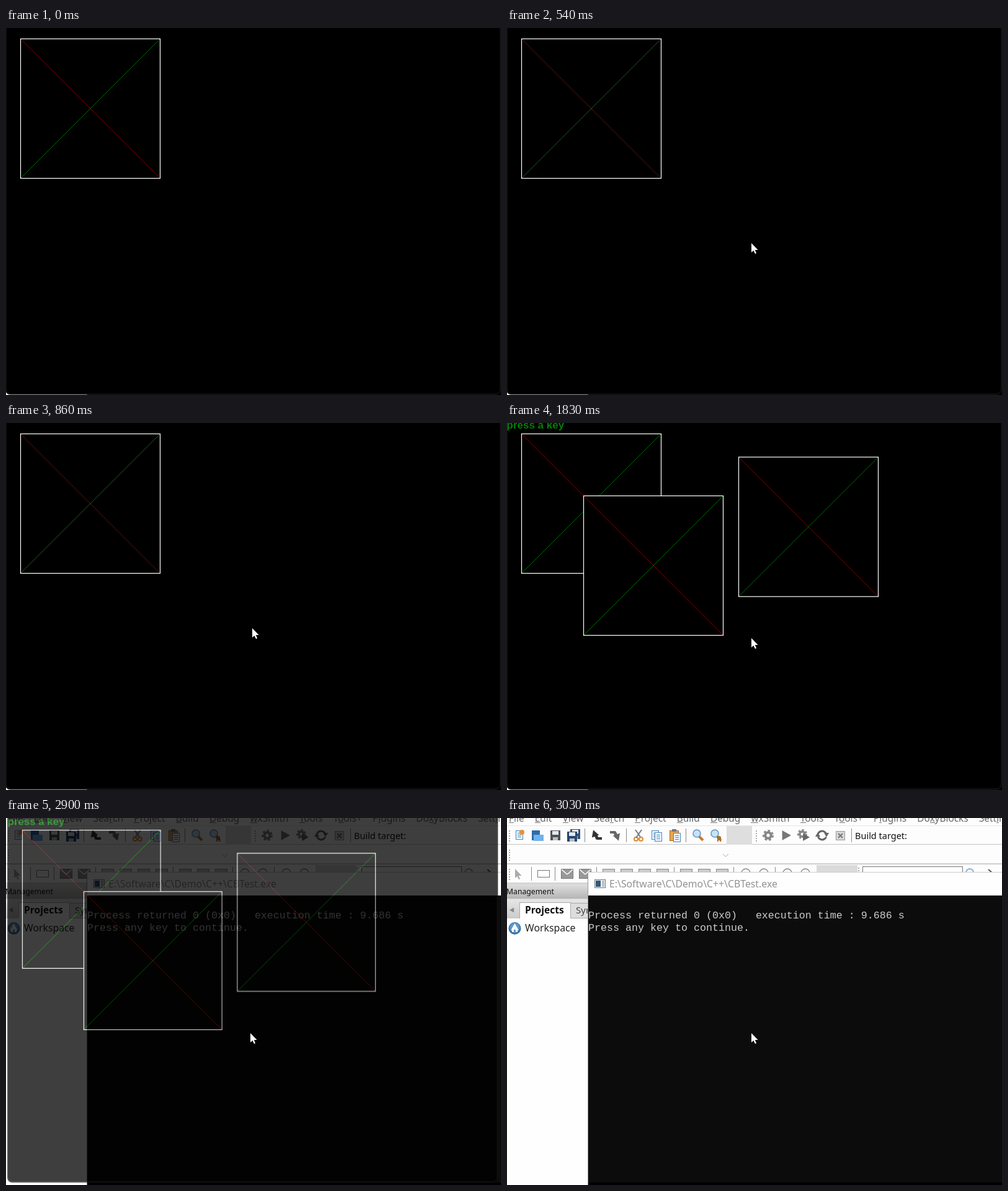
Recreate the animation shown at these times as an HTML page with a canvas. Size 798 by 592 pixels, loop 3.37 s.

```html
<!DOCTYPE html>
<html lang="en">
<head>
<meta charset="utf-8">
<title>Squares</title>
<style>
html, body { margin: 0; width: 100%; height: 100%; overflow: hidden; background: #000; }
canvas { display: block; }
</style>
</head>
<body>
<canvas id="stage" width="798" height="592"></canvas>
<script>
const W = 798, H = 592, LOOP = 3370;
const CLICK = 860, SPREAD = 1830, CLOSE = 2900, GONE = 3030;
const UI = '"Noto Sans", sans-serif';

// Windows and menus reach a little above the stage, so layers keep a margin.
const MARGIN = 40;
function layer() {
  const el = document.createElement('canvas');
  el.width = W + 2 * MARGIN;
  el.height = H + 2 * MARGIN;
  const ctx = el.getContext('2d');
  ctx.translate(MARGIN, MARGIN);
  return ctx;
}
const stage = document.getElementById('stage').getContext('2d');
const desktop = layer(), app = layer();
let c = desktop;

function rect(x, y, w, h, fill) {
  c.fillStyle = fill;
  c.fillRect(x, y, w, h);
}
function box(x, y, w, h, stroke, fill) {
  rect(x, y, w, h, stroke);
  rect(x + 1, y + 1, w - 2, h - 2, fill);
}
function line(x1, y1, x2, y2, stroke, width = 1) {
  c.strokeStyle = stroke;
  c.lineWidth = width;
  c.beginPath();
  c.moveTo(x1, y1);
  c.lineTo(x2, y2);
  c.stroke();
}
function ring(x, y, r, stroke, width = 1, from = 0, to = 2 * Math.PI) {
  c.strokeStyle = stroke;
  c.lineWidth = width;
  c.beginPath();
  c.arc(x, y, r, from, to);
  c.stroke();
}
function disc(x, y, r, fill) {
  c.fillStyle = fill;
  c.beginPath();
  c.arc(x, y, r, 0, 2 * Math.PI);
  c.fill();
}
// Triangle with its tip r to the right, turned by angle.
function triangle(x, y, r, fill, angle = 0) {
  c.save();
  c.translate(x, y);
  c.rotate(angle);
  c.fillStyle = fill;
  c.fill(new Path2D(`M${r} 0L${-r * .8} ${r}V${-r}Z`));
  c.restore();
}
function text(str, x, y, font, fill) {
  c.font = font;
  c.fillStyle = fill;
  c.fillText(str, x, y);
}
function shade(y, h, top, bottom) {
  const g = c.createLinearGradient(0, y, 0, y + h);
  g.addColorStop(0, top);
  g.addColorStop(1, bottom);
  rect(0, y, 131, h, g);
}
function grip(x, y) {
  for (let i = 0; i < 5; i++) rect(x, y + i * 4, 2, 2, '#aaa');
}

const POINTER = new Path2D('M0 0V15L3.5 12L6 17.2L8 16.3L5.8 11H10.6Z');
function pointer(x, y, fill) {
  c.save();
  c.translate(x, y);
  c.fillStyle = fill;
  c.fill(POINTER);
  c.restore();
}

function page(x, y) {
  box(x, y, 12, 15, '#4787bd', '#eef5fc');
  for (let i = 4; i < 12; i += 3) rect(x + 3, y + i, 6, 1, '#4787bd');
}
function floppy(x, y, body) {
  rect(x, y, 16, 16, body);
  rect(x + 3, y + 1, 10, 6, '#e4e8ec');
  rect(x + 4, y + 11, 8, 5, '#b8c0c8');
}
function lens() {
  line(1, 1, 8, 8, '#c77c2b', 4);
  disc(-2, -3, 6, '#c5e3f8');
  ring(-2, -3, 6, '#6597bd', 1.6);
}
function bentArrow(fill) {
  line(-3, -2, 1, 6, fill, 5);
  line(0, 5, 8, 5, fill, 4);
  triangle(-4, -3, 6, fill, -1.9);
}
function gear(r) {
  c.setLineDash([r * .4, r * .385]);
  ring(0, 0, r * .85, '#868686', r * .3);
  c.setLineDash([]);
  ring(0, 0, r * .52, '#868686', r * .45);
}

// Each icon is drawn around its own centre.
const ICONS = {
  n() { page(-6, -8); disc(4, -5, 4, '#e99235'); },
  o() { rect(-9, -8, 13, 16, '#2f6aab'); rect(-6, -1, 16, 10, '#6eb2ec'); },
  s() { floppy(-8, -8, '#4d5358'); },
  S() { floppy(-5, -10, '#31517e'); floppy(-10, -6, '#26456f'); },
  u() { bentArrow('#333'); },
  r() { c.rotate(Math.PI); bentArrow('#666'); },
  x() {
    for (const side of [-1, 1]) {
      line(5 * side, -9, -4 * side, 4, '#727d87', 2);
      ring(4 * side, 6, 3, '#e28b2d', 2);
    }
  },
  c() { page(-8, -8); page(-3, -5); },
  v() { box(-8, -8, 15, 17, '#a66a25', '#e7a550'); rect(-4, -10, 7, 4, '#777'); page(-2, -4); },
  f: lens,
  F() { lens(); text('R', 1, 10, 'bold 12px ' + UI, '#a36324'); },
  g() { gear(9); },
  p() { triangle(0, 0, 8, '#777'); },
  G() { c.translate(-3, -2); gear(8); triangle(6, 5, 6, '#666'); },
  b() {
    for (const turn of [0, Math.PI]) {
      ring(0, 0, 7, '#666', 3, turn + .4, turn + 2.8);
      triangle(7 * Math.cos(turn), -1, 4, '#666', turn + 1.6);
    }
  },
  a() {
    box(-7, -7, 15, 15, '#999', '#d8d8d8');
    line(-3, -3, 4, 4, '#777', 2);
    line(4, -3, -3, 4, '#777', 2);
  },
  P() { pointer(-8, -8, '#aaa'); },
  w() { box(-10, -6, 20, 12, '#777', '#fff'); },
  e() { box(-10, -8, 20, 16, '#777', '#999'); line(-9, -7, 0, 1, '#fff', 1.5); line(9, -7, 0, 1, '#fff', 1.5); },
  d() { box(-10, -8, 20, 16, '#888', '#ccc'); },
  z() { ring(0, -1, 7, '#888', 1.3); },
  '|'() { rect(-1, -11, 1, 22, '#8c8c8c'); }
};
function toolbar(x, y, icons) {
  for (const key of icons) {
    const bar = key === '|';
    c.save();
    c.translate(bar ? x - 10 : x, y);
    ICONS[key]();
    c.restore();
    x += bar ? 9 : 29;
  }
}

function drawMenu() {
  const font = '15.4px ' + UI;
  const labels = '&File &Edit &View Sea&rch &Project &Build &Debug &wxSmith &Tools T&ools+ P&lugins Do&xyBlocks Sett&ings';
  let x = 3;
  for (const label of labels.split(' ')) {
    const [before, after] = label.split('&');
    text(before + after, x, 5.5, font, '#666');
    const key = x + c.measureText(before).width;
    rect(Math.round(key), 7, Math.round(c.measureText(after[0]).width), 1, '#777');
    x += c.measureText(before + after).width + 17.2;
  }
}

function drawToolbars() {
  rect(0, 12, W, 1, '#e6e6e6');
  rect(0, 42, W, 1, '#c4c4c4');
  rect(0, 73, W, 2, '#cfcfcf');
  rect(354, 13, 41, 30, '#dedede');
  rect(499, 76, 66, 28, '#dadada');
  [20, 51, 82].forEach(y => grip(3, y));
  grip(401, 20);
  grip(566, 80);

  toolbar(20, 28, 'nosS|ur|xcv|fF');
  toolbar(421, 28, 'gpGba|');
  text('Build target:', 561, 34, '14.5px ' + UI, '#111');
  line(348, 58, 352.5, 62.5, '#aaa');
  line(352.5, 62.5, 357, 58, '#aaa');
  toolbar(21, 90, 'P|w|ee|dddd|ddd|zz|zz');
  box(573, 78, 162, 22, '#777', '#fff');
  ring(746, 88, 6, '#8ab0cf', 2);
  line(776, 83, 783, 89, '#555', 2);
}

function drawSidePanel() {
  rect(0, 104, 131, 62, '#d6d6d6');
  shade(107, 23, '#dedede', '#b5b5b5');
  text('Management', -1, 123, '12.2px ' + UI, '#111');
  shade(131, 31, '#e6e6e6', '#cbcbcb');
  triangle(8, 148.5, 4, '#888', Math.PI);
  box(102, 137, 40, 25, '#aaa', '#ddd');
  text('Symbols', 111, 154, '15px ' + UI, '#444');
  box(20, 136, 83, 27, '#aaa', '#fff');
  text('Projects', 29, 154, 'bold 15.6px ' + UI, '#111');
  rect(0, 162, 131, H - 162, '#fefefe');

  disc(12.5, 178, 10, '#416f9c');
  disc(12.5, 177, 8, '#5b9bd0');
  triangle(12.5, 176, 6, '#fff', -Math.PI / 2);
  rect(8, 179, 9, 5, '#fff');
  rect(11, 180, 3, 4, '#5b9bd0');
  text('Workspace', 29, 183, '15.8px ' + UI, '#222');
}

function drawConsole() {
  rect(130, 88, 1, H, '#999');
  rect(131, 87, W, 38, '#fefefe');
  rect(131, 87, W, 1, '#ccc');
  box(141, 99, 18, 14, '#777', '#f4f4f4');
  rect(143, 101, 8, 10, '#30587c');
  rect(153, 101, 4, 10, '#b9c3cc');
  text('E:\\Software\\C\\Demo\\C++\\CBTest.exe', 165, 112, '15.8px ' + UI, '#929292');
  rect(131, 125, W, H, '#0c0c0c');
  rect(131, 588, W, 4, '#000');
  const font = '16.66px "Liberation Mono", monospace';
  text('Process returned 0 (0x0)   execution time : 9.686 s', 131, 162, font, '#ccc');
  text('Press any key to continue.', 131, 182, font, '#ccc');
}

function drawDesktop() {
  rect(0, 0, W, H, '#fdfdfd');
  drawMenu();
  drawToolbars();
  drawSidePanel();
  drawConsole();
}

function square(x, y) {
  const s = 225;
  rect(x, y, s, s, '#000');
  line(x, y, x + s, y + s, '#7c0000');
  line(x + s, y, x, y + s, '#006c00');
  c.strokeStyle = '#fff';
  c.lineWidth = 1.2;
  c.strokeRect(x, y, s, s);
}

function drawApp(t) {
  c = app;
  c.clearRect(-MARGIN, -MARGIN, W + 2 * MARGIN, H + 2 * MARGIN);
  rect(-1, -38, W + 1, 36, '#fff');
  c.beginPath();
  c.roundRect(-1, -3, W + 1, 594.5, [0, 0, 8, 8]);
  c.fillStyle = '#000';
  c.fill();
  c.beginPath();
  c.roundRect(0, -3, W - 1, 593.5, [0, 0, 8, 8]);
  c.strokeStyle = '#222';
  c.lineWidth = 1;
  c.stroke();
  square(23.5, 17.5);
  if (t >= SPREAD) {
    square(123.5, 117.5);
    square(373.5, 55);
    text('press a key', -.5, 8.5, 'bold 17px "Liberation Sans", sans-serif', '#008000');
  }
}

// The closing window shrinks and fades in hard steps.
function closing(t) {
  if (t < CLOSE) return { scale: 1, alpha: 1 };
  return t < CLOSE + 60 ? { scale: .99, alpha: .755 } : { scale: .951, alpha: .33 };
}

function placeApp(t) {
  const { scale, alpha } = closing(t);
  const cx = 311, cy = 237;
  stage.save();
  stage.globalAlpha = alpha;
  stage.translate(cx, cy);
  stage.scale(scale, scale);
  stage.drawImage(app.canvas, -cx - MARGIN, -cy - MARGIN);
  stage.restore();
}

// The pointer glides in with easing, sampled at four moments.
function drawPointer(t) {
  const step = Math.min(3, Math.floor((t - 290) / 83));
  const left = (1 - step / 3) ** 1.5;
  const nudge = t >= CLICK && t < CLICK + 60;
  pointer(394 + Math.round(220 * left) + 3 * nudge, 347 + Math.round(174 * left) - 16 * nudge, '#fff');
}

function draw(t) {
  stage.drawImage(desktop.canvas, -MARGIN, -MARGIN);
  if (t < GONE) {
    drawApp(t);
    placeApp(t);
  }
  c = stage;
  if (t >= 290) drawPointer(t);
}

drawDesktop();
const start = performance.now();
function tick() {
  draw((performance.now() - start) % LOOP);
  requestAnimationFrame(tick);
}
tick();
</script>
</body>
</html>
```
